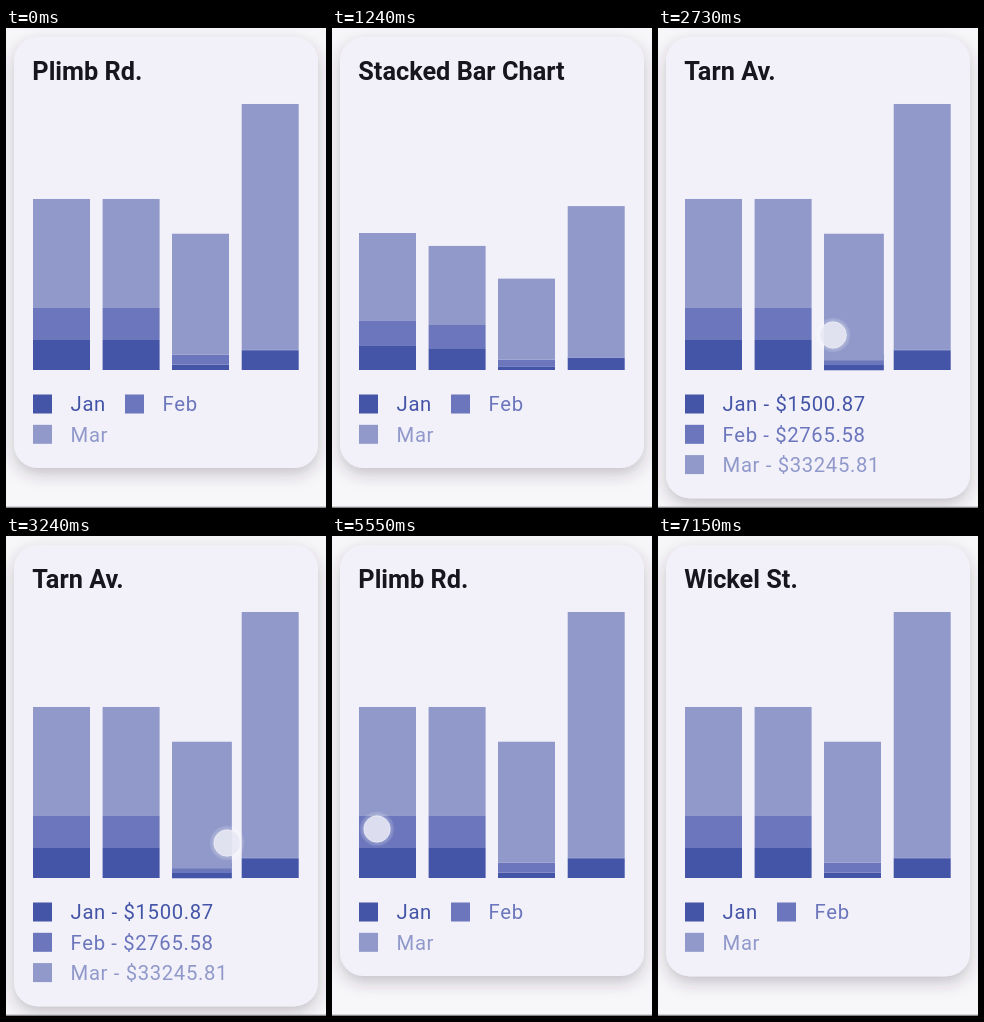
These frames come from a looping animation (320x480 px, 7.18 s). An HTML page:

```html
<!DOCTYPE html>
<html lang="en">
<head>
<meta charset="utf-8">
<title>Stacked bar chart</title>
<style>
html, body { margin: 0; width: 100%; height: 100%; overflow: hidden; background: #f7f7f9; }
svg { display: block; width: 100%; height: 100%; }
text { font-family: Roboto, sans-serif; white-space: pre; }
.title { font-size: 25.3px; font-weight: 700; fill: #17161c; }
.label { font-size: 20.3px; letter-spacing: .64px; }
</style>
</head>
<body>
<svg viewBox="0 0 320 480">
  <defs>
    <filter id="shadow" x="-20%" y="-20%" width="140%" height="140%">
      <feDropShadow dx="0" dy="6" stdDeviation="8" flood-color="#38363f" flood-opacity=".27"/>
    </filter>
    <radialGradient id="glow">
      <stop offset=".75" stop-color="#fff" stop-opacity=".3"/>
      <stop offset="1" stop-color="#fff" stop-opacity=".06"/>
    </radialGradient>
    <clipPath id="clip"><rect id="clipBox" x="0" y="356" width="320"/></clipPath>
  </defs>
  <rect width="320" height="480" fill="#f7f7f9"/>
  <rect id="card" x="8" y="9.5" width="304" rx="24" fill="#f2f1fa" filter="url(#shadow)"/>
  <rect y="478.7" width="320" height="1.3" fill="#85858a"/>
  <g id="content">
    <text id="title" class="title" x="26.3" y="51.7"></text>
    <g id="bars"></g>
    <g id="legend" clip-path="url(#clip)"></g>
  </g>
  <g id="touch">
    <circle r="17.5" fill="url(#glow)"/>
    <circle r="13.2" fill="#e6e7f2" fill-opacity=".88" stroke="#f4f4fb" stroke-opacity=".6"/>
  </g>
</svg>
<script>
const LOOP = 7180;
const BASE = 342, BAR_W = 57, UNIT = 0.003633, ZOOM = 1.05;
const MONTHS = ["Jan", "Feb", "Mar"];
const COLORS = ["#4455a7", "#6b76bc", "#9099ca"];
const BARS = [
  { name: "Wickel St.", x: 27, delay: 0, values: [8261.68, 8810.34, 30000.57] },
  { name: "Dapplewick Mall", x: 96.6, delay: 46, values: [8261.68, 8810.34, 30000.57] },
  { name: "Tarn Av.", x: 166, delay: 73, values: [1500.87, 2765.58, 33245.81] },
  { name: "Plimb Rd.", x: 235.7, delay: 96, values: [5444.87, 233.58, 67544.81] }
];
// [time, selected bar], -1 when released
const PICKS = [[2305, 1], [2632, 2], [3407, 3], [4565, -1], [5650, 0], [6820, -1]];
const GROW_START = 824, GROW_TIME = 800;

const $ = id => document.getElementById(id);
const clamp = v => Math.min(1, Math.max(0, v));

function make(tag, parent, attrs) {
  const el = document.createElementNS("http://www.w3.org/2000/svg", tag);
  set(el, attrs);
  parent.appendChild(el);
  return el;
}
function set(el, attrs) {
  for (const k in attrs) el.setAttribute(k, attrs[k]);
}
function setText(el, s) {
  if (el.textContent !== s) el.textContent = s;
}

const rects = BARS.map(() => COLORS.map(fill => make("rect", $("bars"), { fill })));
const rows = COLORS.map(fill => ({
  box: make("rect", $("legend"), { width: 19, height: 19, fill }),
  text: make("text", $("legend"), { class: "label", fill })
}));

// cubic-bezier(.4, 0, .2, 1)
function ease(x) {
  if (x <= 0 || x >= 1) return clamp(x);
  let lo = 0, hi = 1;
  for (let i = 0; i < 24; i++) {
    const s = (lo + hi) / 2, r = 1 - s;
    if (1.2 * r * r * s + 0.6 * r * s * s + s * s * s < x) lo = s; else hi = s;
  }
  return lo * lo * (3 - 2 * lo);
}

// critically damped spring, stiffness 400
function spring(ms) {
  const k = Math.max(0, ms) * 0.02;
  return 1 - (1 + k) * Math.exp(-k);
}

function selection(t) {
  let pick = -1, open = 0;
  let title = t < 270 ? BARS[3].name : "Stacked Bar Chart";
  for (const [at, bar] of PICKS) {
    if (t < at) break;
    if (bar < 0) open = 1 - spring(t - at);
    else {
      if (pick < 0) open = spring(t - at);
      else open = spring(t - PICKS[0][0]);
      title = BARS[bar].name;
    }
    pick = bar;
  }
  return { pick, open, title };
}

function opacity(t) {
  if (t < 180) return 1;
  if (t < 270) return 0.4;
  return clamp((t - 670 + 30) / 180) * (t >= 670);
}

function touchPoint(t) {
  if (t >= 1970 && t < 4565) {
    const drag = clamp((t - 2175) / 1520);
    return [125 + 137 * drag, 307 - 2 * clamp((t - 3240) / 455)];
  }
  if (t >= 5550 && t < 6820) return [45 + 12 * clamp((t - 5560) / 150), 293];
  return null;
}

function drawBars(t, pick) {
  BARS.forEach((bar, i) => {
    const grow = t < 270 ? 1 : ease((t - GROW_START - bar.delay) / GROW_TIME);
    const zoom = i === pick ? ZOOM : 1;
    let y = BASE;
    bar.values.forEach((v, j) => {
      const h = v * UNIT * grow;
      y -= h;
      set(rects[i][j], { x: bar.x, y, width: BAR_W * zoom, height: h * zoom });
    });
  });
}

function drawLegend(pick) {
  rows.forEach(({ box, text }, j) => {
    const open = pick >= 0;
    const x = !open && j === 1 ? 119 : 27;
    const line = open ? j : j >> 1;
    const y = 366.5 + line * 30.3;
    set(box, { x, y });
    set(text, { x: x + 37.6, y: y + 16.7 });
    setText(text, MONTHS[j] + (open ? " - $" + BARS[pick].values[j].toFixed(2) : ""));
  });
}

function draw(t) {
  const { pick, open, title } = selection(t);
  const bottom = 440 + 30.3 * open;
  set($("card"), { height: bottom - 9.5 });
  set($("clipBox"), { height: bottom - 20 - 356 });
  set($("content"), { opacity: opacity(t) });
  setText($("title"), title);
  drawBars(t, pick);
  drawLegend(pick);
  const p = touchPoint(t);
  set($("touch"), p
    ? { visibility: "visible", transform: `translate(${p[0]} ${p[1]})` }
    : { visibility: "hidden" });
}

const start = performance.now();
function tick() {
  draw((performance.now() - start) % LOOP);
  requestAnimationFrame(tick);
}
tick();
</script>
</body>
</html>
```
